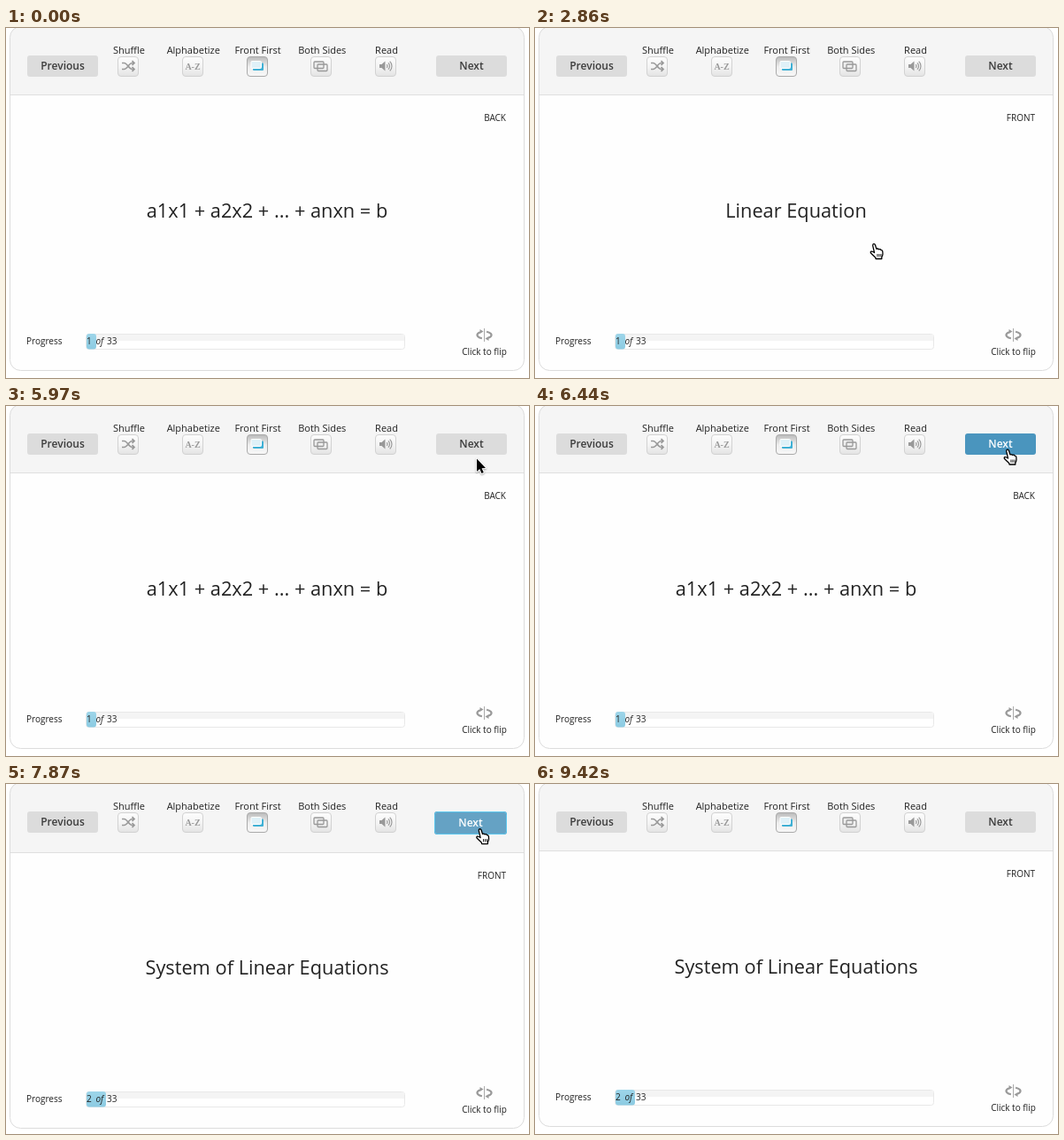
Recreate the animation shown at these times as an HTML page with a canvas. Size 591 px wide and 395 px high, loop 9520 ms.

```html
<!DOCTYPE html>
<html lang="en">
<head>
<meta charset="utf-8">
<title>Flashcards</title>
<style>
html, body { margin: 0; width: 100%; height: 100%; overflow: hidden; background: #fff; }
canvas { display: block; }
</style>
</head>
<body>
<canvas id="stage" width="591" height="395"></canvas>
<script>
const c = document.getElementById('stage').getContext('2d');
const LOOP = 9520, TICK = 116.6, LEAD = 60;
const ENTER = 1320, HAND = 2620, FLIP = 2860, UNFLIP = 4540;
const TRAVEL = 5500, NEXT_CARD = 6910, LEAVE = 7870, RESET = 9420;
const SANS = '"Open Sans", "Noto Sans", sans-serif';
const SERIF = '"Liberation Serif", "Noto Serif", serif';
const INK = '#222', GREY = '#999';

// The pointer eases between a few resting places
const rest = [382.5, 243], below = [532, 59.5], button = [533.5, 48.5];
const moves = [
  { at: ENTER, until: 1670, from: [423, 361], to: rest },
  { at: TRAVEL, until: 5970, from: rest, to: below },
  { at: 5970, until: 6440, from: below, to: button },
  { at: LEAVE, until: 8220, from: button, to: [561, 75] }
];

const arrowShape = new Path2D('M0 0V14.5L3.3 11.4 5.5 16.5 7.8 15.5 5.6 10.6 10 10.4Z');
const handShape = new Path2D('M5 10.5L3.2 2.6Q3 .9 4.4 .7Q5.6 .6 6.1 2.2L7.4 6.4Q9 5.5 10 6.9Q11.8 6.1 12.5 7.7' +
  'Q14 7.4 14.3 9.2L14.5 12Q14.4 14 13.3 15.5V17.5H6.6L6.2 16Q3.5 13.5 1 11Q.3 9.6 1.4 9.1Q3 8.8 5 10.5Z');
const shuffleShape = new Path2D('M-7 -3.5H-4.5C-1 -3.5 1 3.5 4.5 3.5H6M-7 3.5H-4.5C-1 3.5 1 -3.5 4.5 -3.5H6' +
  'M4.5 -6L7 -3.5L4.5 -1M4.5 1L7 3.5L4.5 6');
const speakerShape = new Path2D('M-7 -2H-4.5L-.5 -5.5V5.5L-4.5 2H-7Z');
const flipHead = new Path2D('M-5 -6.5L-1 -4L-5 -1.5Z');

const ramp = (t, a, b) => Math.min(1, Math.max(0, (t - a) / (b - a)));
const smooth = k => k * k * (3 - 2 * k);
const lerp = (a, b, k) => a.map((v, i) => v + (b[i] - v) * k);
const mix = (a, b, k) => `rgb(${lerp(a, b, k).map(Math.round)})`;

function text(str, x, y, size, align = 'left', style = '', color = INK, family = SANS) {
  c.font = `${style} ${size}px ${family}`;
  c.textAlign = align;
  c.fillStyle = color;
  c.fillText(str, x, y);
}

function box(x, y, w, h, r, fill, stroke, line = 1) {
  c.beginPath();
  c.roundRect(x, y, w, h, r);
  if (fill) { c.fillStyle = fill; c.fill(); }
  if (stroke) { pen(stroke, line); c.stroke(); }
}

function arc(x, y, rx, ry, from, to) {
  c.beginPath();
  c.ellipse(x, y, rx, ry, 0, from, to);
  c.stroke();
}

function pen(color, width) {
  c.strokeStyle = color;
  c.lineWidth = width;
}

function shade(y0, y1, ...colors) {
  const g = c.createLinearGradient(0, y0, 0, y1);
  colors.forEach((color, i) => g.addColorStop(i / (colors.length - 1), color));
  return g;
}

function at(x, y, paint) {
  c.save();
  c.translate(x, y);
  paint();
  c.restore();
}

// Icons are drawn around the middle of their tool button
const tools = {
  'Shuffle'() {
    pen(GREY, 1.7);
    c.stroke(shuffleShape);
  },
  'Alphabetize'() {
    text('A-Z', 0, 4, 10, 'center', 'bold', GREY, SERIF);
  },
  'Front First'() {
    box(-5, -3.5, 12, 8.5, 1, '#3fb0d5');
    box(-7, -5.5, 11.5, 8, 1, '#dff1f8', '#fff');
  },
  'Both Sides'() {
    box(-8, -5, 11, 7.5, 1, '#eee', GREY, 1.3);
    box(-4, -2, 11, 7.5, 1, null, GREY, 1.3);
  },
  'Read'() {
    c.fillStyle = GREY;
    c.fill(speakerShape);
    pen(GREY, 1.2);
    for (const r of [2.5, 5, 7.5]) arc(-.5, 0, r, r, -.8, .8);
  }
};

function toolbar() {
  Object.entries(tools).forEach(([label, icon], i) => {
    const x = 138 + i * 72.75, pressed = label === 'Front First';
    text(label, x + 1, 29, 11, 'center');
    at(Math.round(x), 43, () => {
      if (pressed) box(-11.5, -10.5, 23, 22, 3.5, shade(-10, 12, '#bdbdbd', '#eee', '#f8f8f8'), '#aaa');
      else box(-11.5, -10.5, 23, 22, 3.5, shade(-10, 12, '#fcfcfc', '#f4f4f4', '#e2e2e2'), '#d2d2d2');
      icon();
    });
  });
}

function nextButton(blue, grow) {
  const w = 80 + grow, h = 24 + grow, x = 566 - w;
  box(x, 31, w, h, 3, mix([220, 220, 220], [74, 149, 190], blue));
  if (grow > 1) box(x + .5, 31.5, w - 1, h - 1, 3, null, '#5cc8ee');
  text('Next', 526 - grow / 2, 47 + grow / 2, 12, 'center', '600',
    mix([60, 60, 60], [255, 255, 255], ramp(blue, 0, .7)));
}

function flipIcon() {
  pen(GREY, 2.2);
  c.fillStyle = GREY;
  for (const turn of [0, Math.PI]) {
    at(540.5, 346.5, () => {
      c.rotate(turn);
      arc(0, 0, 8, 4, 1.9, 4.1);
      c.fill(flipHead);
    });
  }
  c.fillStyle = '#aaa';
  c.fillRect(540, 339, 1, 15);
}

function progress(n) {
  text('Progress', 23, 357, 10);
  box(90.5, 345.5, 360, 17, 3, '#fff', '#e8e8e8');
  c.fillStyle = '#f4f4f4';
  c.fillRect(91, 346, 359, 7);
  box(91, 345, 11 * n, 17.5, 3, shade(345, 362, '#9dd5e9', '#8ccbe2'));
  text(n, 91, 357, 10);
  text('of', 101.5, 357, 10, 'left', 'italic');
  text('33', 114, 357, 10);
}

function card(t, shift) {
  const second = t >= NEXT_CARD;
  const front = second || (t >= FLIP && t < UNFLIP);
  const title = second ? 'System of Linear Equations'
    : front ? 'Linear Equation' : 'a1x1 + a2x2 + ... + anxn = b';

  text(title, 295, 214 + Math.floor(shift / 2), 21.75, 'center');
  at(0, shift, () => {
    text(front ? 'FRONT' : 'BACK', 565, 105, 10, 'right');
    progress(second ? 2 : 1);
    flipIcon();
    text('Click to flip', 540.5, 369, 10, 'center');
  });
}

function frame(shift) {
  c.fillStyle = '#fff';
  c.fillRect(0, 0, 591, 395);
  c.save();
  box(4.5, -1.5, 581, 388 + shift, 12, '#fefefe');
  c.clip();
  c.fillStyle = '#f5f5f5';
  c.fillRect(4, -2, 582, 77 + shift);
  c.fillStyle = '#dfdfdf';
  c.fillRect(4, 75 + shift, 582, 1);
  c.restore();
  box(4.5, -1.5, 581, 388 + shift, 12, null, '#dcdcdc');
}

function drawHand() {
  c.fillStyle = '#fff';
  c.fill(handShape);
  pen('#000', 1.3);
  c.lineJoin = 'round';
  c.stroke(handShape);
  c.fillStyle = '#000';
  for (const x of [8, 10, 12]) c.fillRect(x, 12, .9, 3.2);
}

function drawArrow() {
  c.shadowColor = 'rgba(0,0,0,.35)';
  c.shadowBlur = 2;
  c.shadowOffsetY = 1;
  pen('#fff', 2);
  c.lineJoin = 'round';
  c.stroke(arrowShape);
  c.shadowColor = 'transparent';
  c.fillStyle = '#000';
  c.fill(arrowShape);
}

function pointer(step, t) {
  const move = moves.findLast(m => m.at <= step);
  if (!move || t >= RESET) return;
  const [x, y] = lerp(move.from, move.to, smooth(ramp(step, move.at - LEAD, move.until)));
  const overCard = t >= HAND && t < TRAVEL, overButton = x > 486 && y < 55;
  if (overCard || overButton) at(x - 4, y, drawHand);
  else at(x, y, drawArrow);
}

// Movement comes in bursts of evenly spaced steps
function stepTime(t) {
  const start = [0, ENTER, TRAVEL, LEAVE].findLast(s => s <= t);
  return start + TICK * Math.min(12, Math.floor((t - start) / TICK));
}

function draw(now) {
  const t = now % LOOP;
  const step = t < RESET ? stepTime(t) : 0;
  const blue = ramp(step, 6050, 6400) * (1 - ramp(step, LEAVE - 80, 8215));
  const grow = Math.round(2 * ramp(step, 6440, 6890) ** 2);

  frame(grow);
  box(24, 31, 80, 24, 3, '#dcdcdc');
  text('Previous', 64, 47, 12, 'center', '600', '#3c3c3c');
  toolbar();
  nextButton(blue, grow);
  card(t, grow);
  pointer(step, t);
  requestAnimationFrame(draw);
}
requestAnimationFrame(draw);
</script>
</body>
</html>
```
